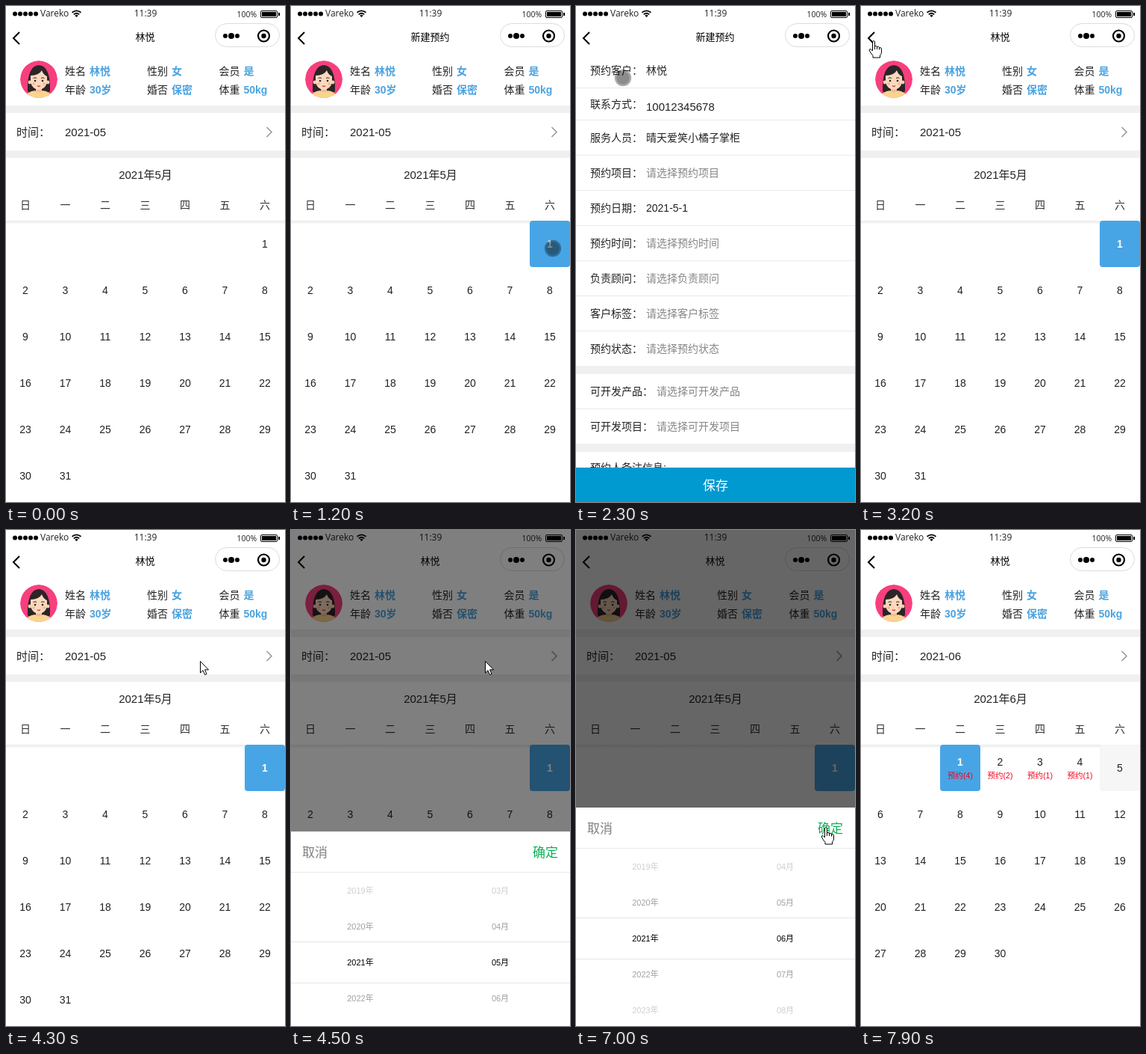
Animation of 374 by 663 pixels, one loop 8000 ms. Source, as an HTML page:

```html
<!DOCTYPE html>
<html lang="zh">
<head>
<meta charset="utf-8">
<title>预约日历</title>
<style>
html, body { margin: 0; width: 100%; height: 100%; overflow: hidden; background: #fff; }
svg { display: block; width: 100%; height: 100%; }
text { font-family: "Liberation Sans", "Noto Sans CJK SC", "Noto Sans CJK", sans-serif; white-space: pre; }
.sys { font-family: "Open Sans", "Noto Sans", sans-serif; }
</style>
</head>
<body>
<svg id="stage" viewBox="0 0 374 663">
  <defs>
    <clipPath id="face"><circle cx="44" cy="98" r="25"/></clipPath>
    <clipPath id="wheelBox"><rect y="56" width="374" height="236"/></clipPath>
    <clipPath id="formBox"><rect y="56" width="374" height="607"/></clipPath>
    <linearGradient id="fadeTop" x2="0" y2="1">
      <stop stop-color="#fff" stop-opacity=".9"/><stop offset="1" stop-color="#fff" stop-opacity=".55"/>
    </linearGradient>
    <linearGradient id="fadeBottom" x2="0" y2="1">
      <stop stop-color="#fff" stop-opacity=".55"/><stop offset="1" stop-color="#fff" stop-opacity=".9"/>
    </linearGradient>
    <linearGradient id="shade" x2="0" y2="1">
      <stop stop-color="#e9e9e9"/><stop offset="1" stop-color="#fff"/>
    </linearGradient>
  </defs>
</svg>
<script>
const LOOP = 8000, STEP = 100;
const BLUE = '#48a5e5', INK = '#222', BAND = '#f0f0f0', LINE = '#eaeaea';
const CUSTOMER = '林悦', CARRIER = 'Vareko';
const stage = document.getElementById('stage');

function add(parent, tag, attrs = {}, content) {
  const node = document.createElementNS('http://www.w3.org/2000/svg', tag);
  for (const key in attrs) node.setAttribute(key, attrs[key]);
  if (content !== undefined) node.textContent = content;
  parent.appendChild(node);
  return node;
}
const group = (parent, attrs) => add(parent, 'g', attrs);
const rect = (parent, x, y, width, height, fill, more) =>
  add(parent, 'rect', { x, y, width, height, fill, ...more });
const circle = (parent, cx, cy, r, fill, more) => add(parent, 'circle', { cx, cy, r, fill, ...more });
const path = (parent, d, fill, more) => add(parent, 'path', { d, fill, ...more });
const stroke = (parent, d, color, width) => path(parent, d, 'none', { stroke: color, 'stroke-width': width });
// y is the middle of the glyphs
const label = (parent, x, y, size, str, fill = INK, more) =>
  add(parent, 'text', { x, y: y + size * .37, 'font-size': size, fill, ...more }, str);
const mid = { 'text-anchor': 'middle' };
const bold = { 'font-weight': 700 };
const show = (node, on) => node.setAttribute('visibility', on ? 'visible' : 'hidden');
const move = (node, x, y) => node.setAttribute('transform', `translate(${x} ${y})`);

// Linear track through rows of [time, ...values]
function track(rows, t) {
  let i = 0;
  while (i < rows.length - 1 && rows[i + 1][0] <= t) i++;
  const a = rows[i], b = rows[i + 1];
  if (!b || t <= a[0]) return a.slice(1);
  const k = (t - a[0]) / (b[0] - a[0]);
  return a.slice(1).map((v, n) => typeof v === 'number' ? v + (b[n + 1] - v) * k : v);
}

function drawAvatar(parent) {
  const g = group(parent, { 'clip-path': 'url(#face)' });
  circle(g, 44, 98, 25, '#f83f7e');
  path(g, 'M29 114Q28 80 44 79Q60 80 59 114Q52 120 44 119Q35 120 29 114Z', '#2b2528');
  rect(g, 40, 106, 8, 10, '#f0bd98');
  path(g, 'M25 125Q27 114 39 113Q44 118 49 113Q61 114 63 125Z', '#fbd38e');
  circle(g, 32, 102, 2.4, '#f7cfae');
  circle(g, 56, 102, 2.4, '#f7cfae');
  path(g, 'M33 93Q44 93 48 86Q50 92 55 94V102Q53 111 44 112Q35 111 33 102Z', '#fbd9bc');
  circle(g, 39, 100, 1.3, '#2b2528');
  circle(g, 49, 100, 1.3, '#2b2528');
  stroke(g, 'M36.5 96.5Q39 95 41 96.5M47 96.5Q49 95 51.5 96.5', '#2b2528', 1);
  circle(g, 37, 104, 1.8, '#f6b3a0');
  circle(g, 51, 104, 1.8, '#f6b3a0');
  stroke(g, 'M42 106.5Q44 108.5 46 106.5', '#e0455a', 1.2);
}

function drawMonth(parent, { month, first, days, picked, bookings = {}, grey }) {
  const page = group(parent);
  const cells = group(page), plain = group(page), booked = group(page);
  const idle = group(page), chosen = group(page);
  label(page, 187, 225, 15, `2021年${month}月`, INK, mid);
  label(page, 79, 168, 15, `2021-0${month}`);
  for (let day = 1; day <= days; day++) {
    const slot = day - 1 + first;
    const x = 26 + 53.5 * (slot % 7), y = 318 + 62 * Math.floor(slot / 7);
    const cell = (layer, fill) => rect(layer, x - 27, y - 31, 54, 62, fill, { rx: 4 });
    const number = (layer, cy, lit) =>
      label(layer, x, cy, 14, day, lit ? '#fff' : INK, lit ? { ...mid, ...bold } : mid);
    const lit = day === picked;
    if (day === grey) cell(cells, '#f6f6f6');
    if (lit) cell(bookings[day] ? cells : chosen, BLUE);
    if (bookings[day]) {
      number(plain, y, lit);
      number(booked, y - 8, lit);
      label(booked, x, y + 10, 10.5, `预约(${bookings[day]})`, '#f5001d', mid);
    } else if (lit) {
      number(idle, y, false);
      number(chosen, y, true);
    } else number(cells, y, false);
  }
  return { page, plain, booked, idle, chosen };
}

// Calendar page
const home = group(stage);
rect(home, 0, 0, 374, 663, '#fff');
drawAvatar(home);
[[79, 87, '姓名', CUSTOMER], [79, 112, '年龄', '30岁'], [189, 87, '性别', '女'],
 [189, 112, '婚否', '保密'], [285.5, 87, '会员', '是'], [285.5, 112, '体重', '50kg']].forEach(([x, y, name, value]) => {
  label(home, x, y, 14, name);
  label(home, x + 33, y, 14, value, '#4aa3df', bold);
});
rect(home, 0, 133, 374, 10, BAND);
rect(home, 0, 193, 374, 10, BAND);
label(home, 14, 168, 15, '时间：');
stroke(home, 'M349.5 162L356 168.5L349.5 175', '#999', 1.6);
[...'日一二三四五六'].forEach((day, i) => label(home, 26 + 53.5 * i, 266, 14, day, '#333', mid));
rect(home, 0, 287, 374, 5, 'url(#shade)');
const may = drawMonth(home, { month: 5, first: 6, days: 31, picked: 1 });
const june = drawMonth(home, { month: 6, first: 2, days: 30, picked: 1, grey: 5, bookings: { 1: 4, 2: 2, 3: 1, 4: 1 } });

// Booking form
const form = group(group(stage, { 'clip-path': 'url(#formBox)' }));
rect(form, 0, 56, 374, 607, '#fff');
[[86, '预约客户', CUSTOMER, 1], [131, '联系方式', '10012345678', 1], [176, '服务人员', '晴天爱笑小橘子掌柜', 1],
 [223, '预约项目'], [270, '预约日期', '2021-5-1', 1], [317, '预约时间'], [364, '负责顾问'],
 [411, '客户标签'], [458, '预约状态'], [515, '可开发产品'], [562, '可开发项目']].forEach(([y, name, value, set], i) => {
  const tel = i === 1;
  label(form, 19, y, 14, name + '：');
  label(form, name.length > 4 ? 108 : 94, y + (tel ? 3 : 0), tel ? 15 : 14, value || '请选择' + name, set ? INK : '#858585');
});
label(form, 19, 617, 14, '预约人备注信息:');
[109, 152, 199, 246, 293, 340, 387, 434, 538].forEach(y => rect(form, 0, y, 374, 1, LINE));
rect(form, 0, 481, 374, 11, BAND);
rect(form, 0, 585, 374, 11, BAND);
rect(form, 0, 617, 374, 46, '#0099d0');
label(form, 187, 641, 17, '保存', '#fff', mid);

// Status and title bars
const bar = group(stage);
for (let i = 0; i < 5; i++) circle(bar, 12 + 7 * i, 10.5, 3, '#000');
label(bar, 46, 10, 12, CARRIER, INK, { class: 'sys' });
stroke(bar, 'M88.5 8.8Q94.5 4 100.5 8.8M90.8 11.4Q94.5 8.2 98.2 11.4', '#000', 1.8);
path(bar, 'M92.3 12.7Q94.5 11 96.7 12.7L94.5 15Z', '#000');
label(bar, 187, 10, 12, '11:39', INK, { class: 'sys', ...mid });
label(bar, 309.5, 11, 10.5, '100%', INK, { class: 'sys' });
rect(bar, 341.5, 6.5, 22, 9, '#fff', { rx: 1.5, stroke: '#000' });
rect(bar, 343, 8, 19, 6, '#000');
rect(bar, 365, 9, 2, 4, '#000');
stroke(bar, 'M18 35L10 43L18 51', '#000', 2);
const title = label(bar, 186.5, 41, 13, CUSTOMER, '#000', mid);
rect(bar, 280.5, 23.5, 86, 31, '#fff', { rx: 15.5, stroke: '#dcdcdc' });
[[294, 3], [302, 4], [310, 3]].forEach(([x, r]) => circle(bar, x, 40, r, '#000'));
circle(bar, 345.5, 40, 7.5, 'none', { stroke: '#000', 'stroke-width': 2.2 });
circle(bar, 345.5, 40, 3.2, '#000');

// Month picker
const mask = rect(stage, 0, 0, 374, 663, '#000');
const sheet = group(stage);
rect(sheet, 0, 0, 374, 663, '#fff');
label(sheet, 15, 28, 17, '取消', '#808080');
label(sheet, 324, 28, 17, '确定', '#07b053');
rect(sheet, 0, 54, 374, 1, LINE);
const wheels = group(sheet, { 'clip-path': 'url(#wheelBox)' });
for (let i = -2; i <= 2; i++) label(wheels, 93, 175 + 48 * i, 11, `${2021 + i}年`, '#000', mid);
const monthWheel = group(wheels);
for (let m = 1; m <= 12; m++)
  label(monthWheel, 280.5, 175 + 48 * m, 11, String(m).padStart(2, '0') + '月', '#000', mid);
rect(sheet, 0, 55, 374, 92, 'url(#fadeTop)');
rect(sheet, 0, 203, 374, 92, 'url(#fadeBottom)');
rect(sheet, 0, 147, 374, 1, '#e5e5e5');
rect(sheet, 0, 202, 374, 1, '#e5e5e5');

// Pointers
const pointers = { dot: group(stage), arrow: group(stage), hand: group(stage) };
circle(pointers.dot, 0, 0, 11.2, '#000', { opacity: .33 });
circle(pointers.dot, 0, 0, 8.8, '#000', { opacity: .18 });
const outline = { stroke: '#000', 'stroke-linejoin': 'round' };
path(pointers.arrow, 'M.5.5V16L4 12.7L6.5 18.5L9 17.5L6.5 11.8H11.5Z', '#fff', outline);
path(pointers.hand, 'M-1.5 1.5Q0-.5 1.5 1.5V8Q3 6.5 4.5 8.5Q6.5 7.5 7.5 9.5Q10.5 9 10.5 12V16Q10 19 8.5 20V23H-1V20.5Q-4 17-6 13Q-5.5 10.5-3.5 12L-1.5 14Z', '#fff', outline);
stroke(pointers.hand, 'M1.5 8V12M4.5 8.5V12M7.5 9.5V12.5', '#000', 1);

const pointerPath = [
  [0, 385, 90, 'none'], [300, 366, 113, 'dot'], [600, 357, 235, 'dot'], [900, 351, 324, 'dot'],
  [1600, 351, 324, 'dot'], [2000, 160, 175, 'dot'], [2300, 63, 96, 'dot'], [2500, 33, 66, 'dot'],
  [2600, 27, 50, 'hand'], [2800, 17, 46, 'hand'], [3400, 17, 46, 'hand'],
  [3500, 34, 62, 'dot'], [4100, 250, 216, 'dot'], [4200, 261, 182, 'dot'],
  [4300, 260, 175, 'arrow'], [4600, 260, 175, 'arrow'], [5000, 294, 590, 'arrow'],
  [5300, 294, 590, 'arrow'], [6000, 294, 542, 'arrow'], [6200, 294, 542, 'arrow'],
  [6900, 332, 412, 'hand'], [7000, 335, 397, 'hand'], [7100, 335, 410, 'dot'],
  [7300, 335, 410, 'dot'], [7800, 290, 345, 'dot'], [7900, 290, 345, 'none']
];
const formSlide = [[1400, 374], [1500, 61], [1600, 61], [1700, 0], [3000, 0], [3100, 155], [3200, 374]];
const sheetSlide = [[4300, 663], [4400, 563], [4500, 403], [4600, 378], [4700, 371], [7000, 371], [7100, 663]];
const maskFade = [[4300, 0], [4400, .25], [4500, .5], [4600, .6], [7000, .6], [7100, 0]];
const monthRoll = [[5300, 5], [6000, 5.9], [6200, 6]];

function render(t) {
  const picked = t >= 1100, isJune = t >= 7200, booked = t >= 7400;
  may.page.setAttribute('display', isJune ? 'none' : 'inline');
  june.page.setAttribute('display', isJune ? 'inline' : 'none');
  show(may.chosen, picked);
  show(may.idle, !picked);
  show(june.plain, !booked);
  show(june.booked, booked);
  title.textContent = t >= 1200 && t < 3100 ? '新建预约' : CUSTOMER;
  move(form, track(formSlide, t)[0], 0);
  move(sheet, 0, track(sheetSlide, t)[0]);
  mask.setAttribute('opacity', track(maskFade, t)[0]);
  move(monthWheel, 0, -48 * track(monthRoll, t)[0]);
  const [x, y, kind] = track(pointerPath, t);
  for (const name in pointers) {
    show(pointers[name], name === kind);
    move(pointers[name], x, y);
  }
}

const start = performance.now();
function tick() {
  const t = (performance.now() - start) % LOOP;
  render(Math.floor(t / STEP) * STEP);
  requestAnimationFrame(tick);
}
tick();
</script>
</body>
</html>
```
